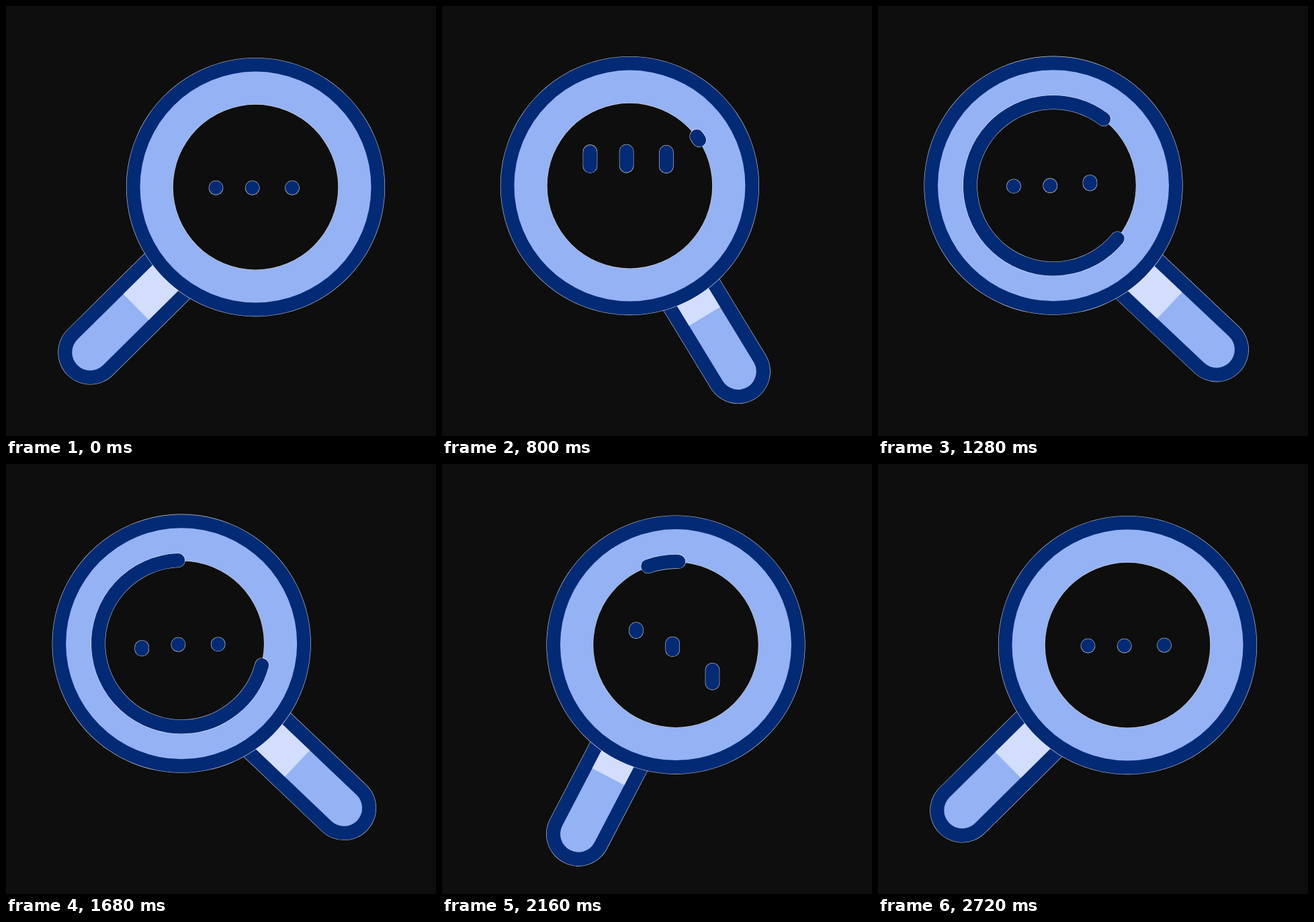
These frames come from a looping animation (640x640 px, 3000 ms). An HTML page with a canvas:

```html
<!DOCTYPE html>
<html lang="en">
<head>
<meta charset="utf-8">
<title>Searching</title>
<style>
  html, body { margin: 0; width: 100%; height: 100%; overflow: hidden; background: #0e0e0e; }
  canvas { display: block; width: 640px; height: 640px; }
</style>
</head>
<body>
<canvas id="stage" width="640" height="640"></canvas>
<script>
const ctx = document.getElementById('stage').getContext('2d');
const LOOP = 3000, STEP = 40;
const BACK = '#0e0e0e', DARK = '#032a75', LIGHT = '#94b2f4', PALE = '#d3ddfd';
const RIM = 'rgba(255, 255, 255, 0.8)';

const clamp = x => Math.min(1, Math.max(0, x));
const mix = (a, b, p) => a + (b - a) * p;
const rad = deg => deg * Math.PI / 180;
const cubic = u => u < 0.5 ? 4 * u ** 3 : 1 - 4 * (1 - u) ** 3;
const sine = u => (1 - Math.cos(Math.PI * u)) / 2;

// Cubic Bezier easing with control points (0.57, 0) and (b, 1).
function swing(u, b) {
  const a = 0.57;
  let lo = 0, hi = 1;
  for (let i = 0; i < 24; i++) {
    const s = (lo + hi) / 2, r = 1 - s;
    if (3 * r * r * s * a + 3 * r * s * s * b + s ** 3 < u) lo = s; else hi = s;
  }
  return lo * lo * (3 - 2 * lo);
}

// Progress of the trip to the left and back.
function trip(t, softness = 0.08, back = 1640) {
  const leg = from => swing(clamp((t - from) / 1065), softness);
  return leg(240) - leg(back);
}

// Keys are [time, value, easing towards this key].
function track(t, keys) {
  let value = keys[0][1];
  for (let i = 1; i < keys.length; i++) {
    const [t0, v0] = keys[i - 1], [t1, v1, ease = cubic] = keys[i];
    if (t >= t0) value = mix(v0, v1, ease(clamp((t - t0) / (t1 - t0))));
  }
  return value;
}

const hop = (up, down, settle) => [
  [280, 0], [720, up], [1300, 0], [1540, 0], [1980, down], [2160, settle], [2620, 0, sine]
];
const TOP = hop(52, -37, 24), BOTTOM = hop(31, -56, 21);
const TAIL = [[750, -33], [1300, -53, sine], [1900, -109, sine], [2430, -66, sine]];
const SPAN = [[740, 0], [1400, 274], [2440, 0]];

function handlePath(half) {
  ctx.beginPath();
  ctx.moveTo(half, 25);
  ctx.lineTo(half, 193);
  ctx.arc(0, 193, half, 0, Math.PI);
  ctx.lineTo(-half, 25);
  ctx.closePath();
}

function drawHandle(t) {
  const slide = trip(t, 0.19), turn = trip(t, 0.08, 1624);
  ctx.save();
  ctx.translate(mix(262.5, 363.5, slide), mix(379.8, 379, slide));
  ctx.rotate(rad(mix(45.3, -46.7, turn)));
  for (const [half, color] of [[48, RIM], [47.4, DARK], [27, LIGHT]]) {
    handlePath(half);
    ctx.fillStyle = color;
    ctx.fill();
  }
  ctx.fillStyle = PALE;
  ctx.fillRect(-27, 25, 54, 72);
  ctx.restore();
}

function band(inner, outer, color) {
  ctx.beginPath();
  ctx.arc(0, 0, outer, 0, 2 * Math.PI);
  ctx.arc(0, 0, inner, 0, 2 * Math.PI, true);
  ctx.fillStyle = color;
  ctx.fill();
}

function rimmedStroke(width) {
  ctx.lineCap = 'round';
  for (const [extra, color] of [[1.1, RIM], [0, DARK]]) {
    ctx.lineWidth = width + extra;
    ctx.strokeStyle = color;
    ctx.stroke();
  }
}

function drawArc(t) {
  if (t < 750 || t > 2430) return;
  const tail = track(t, TAIL), span = Math.max(3, track(t, SPAN));
  ctx.beginPath();
  ctx.arc(0, 0, 124, rad(tail), rad(tail - span), true);
  rimmedStroke(20.5);
}

function drawDots(t) {
  [-59, -4.8, 54.5].forEach((x, i) => {
    const local = t - 80 * i;
    ctx.beginPath();
    ctx.moveTo(x, 1 - track(local, TOP));
    ctx.lineTo(x, 1.01 - track(local, BOTTOM));
    rimmedStroke(20.5);
  });
}

function draw(t) {
  const p = trip(t);
  ctx.fillStyle = BACK;
  ctx.fillRect(0, 0, 640, 640);
  drawHandle(t);
  ctx.save();
  ctx.translate(mix(371.5, 261, p), mix(269.6, 267.2, p));
  band(122.8, 192.6, RIM);
  band(171, 192, DARK);
  band(123.4, 172, LIGHT);
  drawArc(t);
  drawDots(t);
  ctx.restore();
}

const start = performance.now();
function tick() {
  const t = (performance.now() - start) % LOOP;
  draw(Math.floor(t / STEP) * STEP);
  requestAnimationFrame(tick);
}
tick();
</script>
</body>
</html>
```
